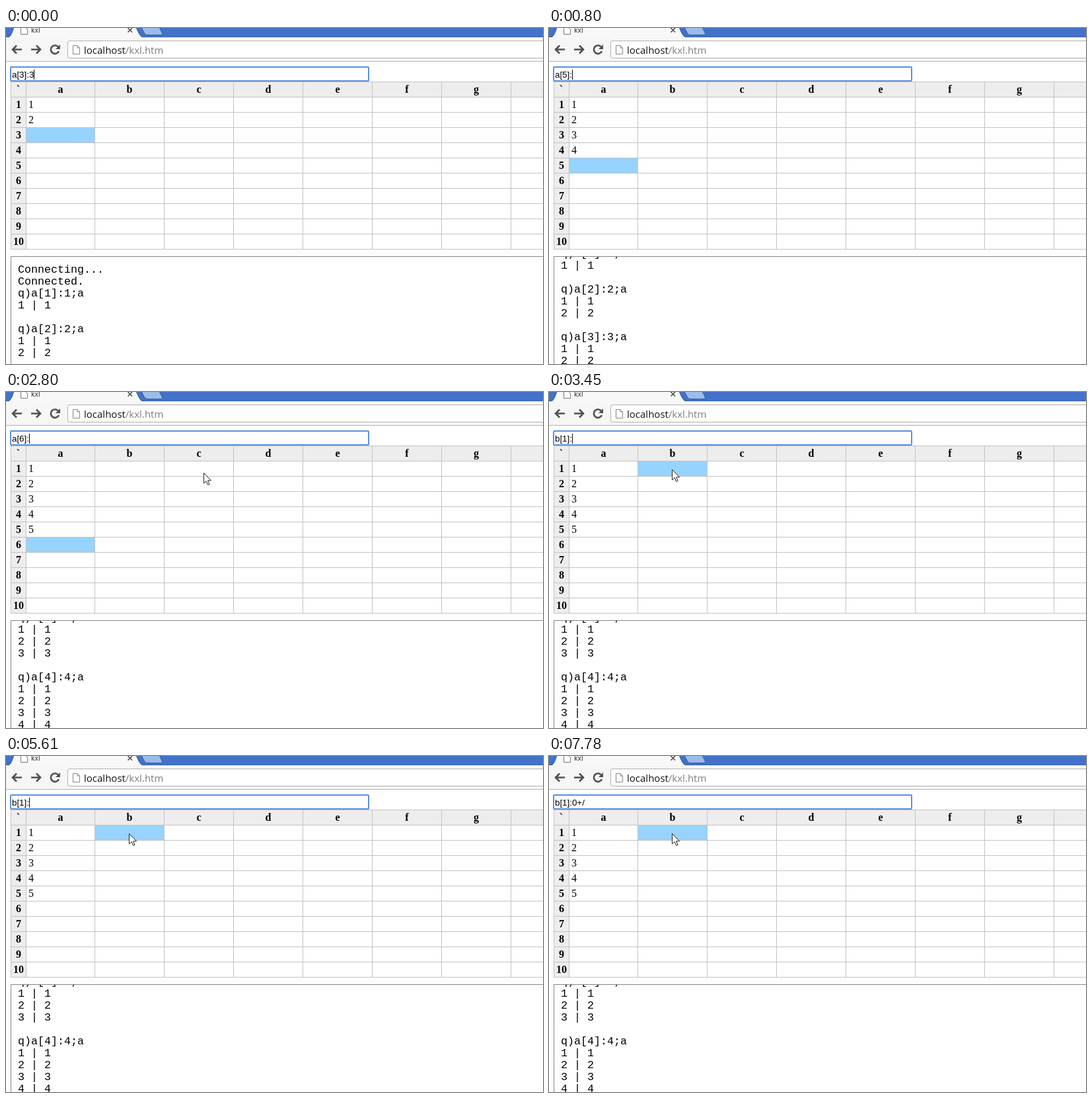
These frames come from a looping animation (813 px wide and 508 px high, 8 s). An HTML page:

```html
<!DOCTYPE html>
<html lang="en">
<head>
<meta charset="utf-8">
<title>Spreadsheet console</title>
<style>
html, body { margin: 0; width: 813px; height: 508px; overflow: hidden; background: #fff; }
svg { display: block; }
text { white-space: pre; }
.crisp { shape-rendering: crispEdges; }
.ui { font-family: "Open Sans", "Noto Sans", sans-serif; }
.cell { font: 16px "Liberation Serif", serif; }
.head { font: bold 16px "Liberation Serif", serif; text-anchor: middle; }
.field { font: 13.333px "Liberation Sans", sans-serif; }
.log { font: 16.667px "Liberation Mono", monospace; }
</style>
</head>
<body>
<svg id="stage" width="813" height="508" viewBox="0 0 813 508">
  <defs>
    <clipPath id="logClip"><rect x="8" y="346" width="805" height="162"/></clipPath>
  </defs>
  <rect width="813" height="508" fill="#fff"/>

  <!-- browser frame -->
  <rect width="813" height="14" fill="#4272c9"/>
  <rect y="13" width="813" height="1" fill="#3762b0"/>
  <rect y="14" width="813" height="36" fill="#f6f6f6"/>
  <path d="M0 14.5H3C7 14 9 8 12 -1H197C201 8 203 14 208 14.5Z" fill="#f8f8f8"/>
  <path d="M0 13.5H3C7 13 9 8 12 -1M197 -1C201 8 203 13 208 13.5" fill="none" stroke="#35589c"/>
  <path d="M205 -1L209 7Q210.500 10.500 214 10.500H234Q237.500 10.500 236 7L232 -1Z" fill="#9cbcec" stroke="#35589c"/>
  <path d="M22.500 -1V9.500H32.500V2L29 -1" fill="#fff" stroke="#777"/>
  <text class="ui" x="38" y="7" font-size="10.500" fill="#222">kxl</text>
  <path d="M184.500 0L191 6.500M191 0L184.500 6.500" stroke="#555" stroke-width="1.700"/>
  <g fill="none" stroke="#505050" stroke-width="2.600">
    <path d="M10 32.500H24M16 26.500L10 32.500L16 38.500"/>
    <path d="M38 32.500H52M46 26.500L52 32.500L46 38.500"/>
    <path d="M79 28.500A6.300 6.300 0 1 0 80 35"/>
  </g>
  <path d="M82 25V32H75Z" fill="#505050"/>
  <rect x="93.500" y="19.500" width="730" height="26" rx="2.500" fill="#fff" stroke="#b2b2b2"/>
  <path d="M101.500 26.500H108L111.500 30V39.500H101.500ZM108 26.500V30H111.500" fill="#fff" stroke="#858585"/>
  <text class="ui" x="118" y="39" font-size="15" fill="#111">localhost<tspan fill="#7d7d7d">/kxl.htm</tspan></text>
  <rect y="50" width="813" height="1" fill="#b5b5b5"/>

  <!-- sheet -->
  <g class="crisp">
    <rect x="7" y="81" width="806" height="24" fill="#ededed"/>
    <rect x="7" y="81" width="24" height="254" fill="#ededed"/>
    <rect id="pick" height="22" fill="#96d3ff"/>
    <g id="grid" fill="#c3c3c3"></g>
  </g>
  <g id="labels"></g>
  <g id="values"></g>

  <!-- formula field -->
  <rect id="field" x="7" y="59" width="542" height="21" rx="1" fill="#fff"/>
  <text id="formula" class="field" x="9" y="75"></text>
  <rect id="caret" class="crisp" y="63" width="1" height="15"/>

  <!-- console -->
  <path class="crisp" d="M813 345.500H7.500V508" fill="none" stroke="#858585"/>
  <g clip-path="url(#logClip)"><g id="log"></g></g>

  <path id="mouse" d="M.5 .5V16L4.200 12.600L6.700 18.400L9 17.400L6.600 11.800H11.500Z" fill="#fff" stroke="#222"/>
</svg>
<script>
const LOOP = 8000;
const ROW = 23;
const COLS = [30, 134, 239, 344, 449, 554, 659, 764];
const $ = id => document.getElementById(id);

function add(parent, tag, attrs, text = "") {
  const el = document.createElementNS("http://www.w3.org/2000/svg", tag);
  for (const key in attrs) el.setAttribute(key, attrs[key]);
  el.textContent = text;
  return parent.appendChild(el);
}

for (const x of [7, ...COLS]) add($("grid"), "rect", { x, y: 81, width: 1, height: 254 });
for (let i = 0; i <= 11; i++) add($("grid"), "rect", { x: 7, y: 81 + ROW * i, width: 806, height: 1 });

const heading = (x, y, text) => add($("labels"), "text", { class: "head", x, y }, text);
heading(18.5, 98, "`");
[..."abcdefg"].forEach((name, i) => heading((COLS[i] + COLS[i + 1]) / 2 + 0.5, 98, name));
for (let r = 1; r <= 10; r++) heading(19, 98 + ROW * r, r);

const values = [1, 2, 3, 4, 5].map(r =>
  add($("values"), "text", { class: "cell", x: 34, y: 98 + ROW * r }, r));

const lines = ["Connecting...", "Connected."];
for (let n = 1; n <= 4; n++) {
  lines.push(`q)a[${n}]:${n};a`);
  for (let k = 1; k <= n; k++) lines.push(`${k} | ${k}`);
  lines.push("");
}
lines.forEach((line, i) => add($("log"), "text", { class: "log", x: 18, y: 370 + 18 * i }, line));

// Each step changes only the listed parts; pick is [column, row].
const steps = [
  [0, { text: "a[3]:3", caret: 42, pick: [0, 3], filled: 2, scroll: 0, mouse: null, focus: true }],
  [250, { text: "a[4]:", caret: 35, pick: [0, 4], filled: 3 }],
  [530, { text: "a[4]:4", caret: 42 }],
  [800, { text: "a[5]:", caret: 35, pick: [0, 5], filled: 4, scroll: 60 }],
  [1180, { text: "a[5]:5", caret: 42 }],
  [1500, { text: "a[6]:", caret: 35, pick: [0, 6], filled: 5, scroll: 186 }],
  [2000, { caret: 0 }],
  [2370, { mouse: [720, -5] }],
  [2520, { caret: 35, mouse: [500, 57] }],
  [2650, { mouse: [347, 101] }],
  [2800, { mouse: [299, 122] }],
  [2950, { mouse: [248, 122] }],
  [3080, { caret: 0, mouse: [204, 119] }],
  [3200, { mouse: [188, 117] }],
  [3330, { focus: false, mouse: [186, 117] }],
  [3450, { focus: true, text: "b[1]:", caret: 35, pick: [1, 1] }],
  [3990, { caret: 0 }],
  [4620, { caret: 35 }],
  [5100, { caret: 0 }],
  [5610, { caret: 35 }],
  [6240, { caret: 0 }],
  [6620, { text: "b[1]:0", caret: 42 }],
  [7000, { text: "b[1]:0+", caret: 50 }],
  [7280, { text: "b[1]:0+/", caret: 54 }],
  [7780, { caret: 0 }]
];

function set(id, attrs) {
  for (const key in attrs) $(id).setAttribute(key, attrs[key]);
}

function draw(time) {
  const s = {};
  for (const [at, change] of steps) if (at <= time) Object.assign(s, change);
  const [col, row] = s.pick;
  const left = COLS[col] + 1;
  set("pick", { x: left, y: 82 + ROW * row, width: COLS[col + 1] - left });
  values.forEach((el, i) => el.setAttribute("visibility", i < s.filled ? "visible" : "hidden"));
  $("formula").textContent = s.text;
  set("caret", { x: s.caret, visibility: s.caret ? "visible" : "hidden" });
  set("field", { stroke: s.focus ? "#5b90e0" : "#b4b4b4", "stroke-width": s.focus ? 2 : 1 });
  set("log", { transform: `translate(0 ${-s.scroll})` });
  set("mouse", { visibility: s.mouse ? "visible" : "hidden" });
  if (s.mouse) set("mouse", { transform: `translate(${s.mouse})` });
}

const start = performance.now();
function tick() {
  draw((performance.now() - start) % LOOP);
  requestAnimationFrame(tick);
}
tick();
</script>
</body>
</html>
```
